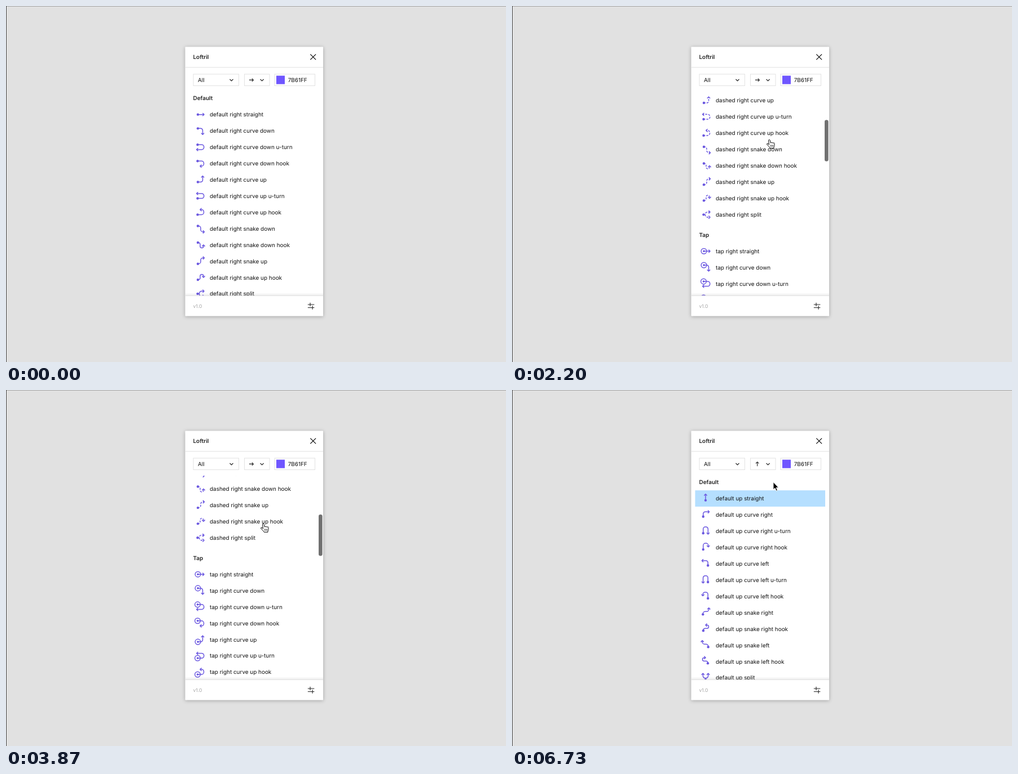
These frames come from a looping animation (886 by 632 pixels, 6.8 s). An HTML page:

```html
<!DOCTYPE html>
<html lang="en">
<head>
<meta charset="utf-8">
<title>Arrow list</title>
<style>
  html, body { margin: 0; width: 100%; height: 100%; overflow: hidden; background: #e1e1e1; }
  svg { display: block; width: 886px; height: 632px; }
  text { font: 9.93px Inter, sans-serif; fill: #111; white-space: pre; text-rendering: geometricPrecision; }
  .bold { font-weight: 600; fill: #222; }
  .line { fill: none; stroke: #222; stroke-width: 1.1; }
  .box { fill: #fff; stroke: #e2e2e2; }
  .ink { fill: none; stroke: #6b58e0; stroke-width: 1.5; stroke-linecap: round; stroke-linejoin: round; }
  .dot { fill: #6b58e0; stroke: none; }
  .panel { fill: #fff; filter: drop-shadow(0 1px 3px rgba(0,0,0,.28)); }
</style>
</head>
<body>
<svg viewBox="0 0 886 632">
  <defs>
    <clipPath id="view"><rect x="318" y="152.5" width="244" height="361.5"/></clipPath>
    <linearGradient id="fade" x2="0" y2="1">
      <stop offset="0" stop-color="#000" stop-opacity="0"/>
      <stop offset="1" stop-color="#000" stop-opacity=".07"/>
    </linearGradient>
  </defs>
  <rect width="886" height="632" fill="#e1e1e1"/>
  <rect width="886" height="1" fill="#a5a5a5"/>
  <rect width="1" height="632" fill="#444"/>
  <rect class="panel" x="317.5" y="72.5" width="244.5" height="478" rx="1"/>

  <g clip-path="url(#view)">
    <rect id="hover" x="324.5" width="230.5" height="28.9" fill="#b5dfff"/>
    <g id="rightList"></g>
    <g id="upList"></g>
  </g>
  <rect x="318" y="509" width="244" height="5" fill="url(#fade)"/>
  <path d="M317.5 109H562M317.5 514.3H562" stroke="#e0e0e0"/>

  <text class="bold" x="331.5" y="94">Loftril</text>
  <path class="line" d="M539.3 85.6l9.8 9.8m0-9.8l-9.8 9.8" style="stroke:#000"/>
  <rect class="box" x="332" y="121" width="80.5" height="20.5"/>
  <rect class="box" x="422.5" y="121" width="44.5" height="20.5"/>
  <rect class="box" x="476" y="121" width="71.5" height="20.5"/>
  <rect x="479" y="123.7" width="15" height="15" fill="#6f56ff"/>
  <text x="340" y="135">All</text>
  <text x="499.7" y="135">7B61FF</text>
  <path class="line" d="M396.5 130l3 3 3-3M450.6 130l3 3 3-3"/>
  <path id="dir" class="line" d="M-3.8 0H3.5M1-2.7L3.7 0 1 2.7"/>
  <text x="331.5" y="536.3" style="font-size:8.6px;fill:#a6a6a6">v1.0</text>
  <path class="line" d="M534.8 530H546.3M539 526.7V533.3M534.8 535.5H546.3M543 532.2V538.8"/>

  <rect id="thumb" x="554" width="6.6" height="73.5" rx="3.3" fill="#707070"/>
  <g id="hand" stroke="#000" stroke-width="1" stroke-linejoin="round">
    <path fill="#fff" d="M-1.6 8.2L-2.4.9A1.3 1.3 0 0 1 .2.4L1.4 5.2A1.2 1.2 0 0 1 3.7 5.1 1.2 1.2 0 0 1 5.9 5.6 1.1 1.1 0 0 1 8 6.5V9.4Q8 11.3 7 12.6V14.3H.3Q-.4 12.9-2 11.2L-5 8.1Q-5.9 6.9-5 6.3-4 5.8-2.9 6.9z"/>
    <path d="M1.3 8.6v3.2M3.4 8.6v3.2M5.5 8.6v3.2" stroke-width=".8"/>
  </g>
  <path id="arrow" fill="#000" stroke="#fff" stroke-width=".9" d="M0 0V13.3L3 10.5 5.2 15.6 7.4 14.7 5.2 9.7H9.3z"/>
</svg>
<script>
const LOOP = 6800, STEP = LOOP / 102, PITCH = 28.93, TOP = 163.7, SECTION = PITCH * 12 + 36;
const el = id => document.getElementById(id);

// Each shape: start point, line, and arrow heads as [x, y, angle]; the second turn is its mirror image.
const shapes = {
  straight: [-4.5, 0, 'H6', [[6.5, 0, 0]]],
  curve: [-4.5, -4.2, 'H.5a3.5 3.5 0 0 1 3.5 3.5V6.3', [[4, 6.6, 90]]],
  'curve u-turn': [-5, -4.2, 'H2.4a3.8 3.8 0 0 1 3.8 3.8v1a3.8 3.8 0 0 1-3.8 3.8H-6.5', [[-6.8, 4.4, 180]]],
  'curve hook': [-5, -4.2, 'H2a4 4 0 0 1 4 4v1a4 4 0 0 1-4 4H0', [[-.6, 4.8, 180]]],
  snake: [-4.5, -4.7, 'H-3.5a4 4 0 0 1 4 4v2.5a4 4 0 0 0 4 4H6.5', [[7, 5.8, 0]]],
  'snake hook': [-4.5, -4, 'H-3.5a3 3 0 0 1 3 3v3.5a3 3 0 0 0 6 0V.5', [[5.5, 0, -90]]],
  split: [-5, 0, 'H-2M6-4.6H2a4 4 0 0 0-4 4v1.2a4 4 0 0 0 4 4H6', [[6.5, -4.6, 0], [6.5, 4.6, 0]]]
};

function startMark(kind, x, y) {
  const circle = (r, extra) => `<circle cx="${x}" cy="${y}" r="${r}" ${extra}/>`;
  const ring = circle(4.8, 'class="ink"');
  if (kind === 'tap') return ring + circle(1.8, 'class="dot"');
  if (kind === 'swipe')
    return ring + circle(1.8, 'class="dot"') +
      `<path class="ink" d="M${x} ${y - 4.8}H-12M${x} ${y + 4.8}H-12"/>`;
  if (kind === 'long press')
    return circle(6.4, 'fill="#7b61ff" opacity=".25"') +
      circle(4.2, 'fill="#7b61ff" opacity=".35"') + circle(2.2, 'class="dot"');
  return circle(2.2, 'class="dot"');
}

function icon(kind, shape, flip, up, y) {
  const [x0, y0, line, heads] = shapes[shape];
  const place = up ? `translate(343 ${y - 1.3}) rotate(-90)` : `translate(344.5 ${y})`;
  const dash = kind === 'dashed' ? 'stroke-dasharray="2.4 3"' : '';
  const tips = heads.map(([x, y, a]) =>
    `<path class="ink" d="M-2.2-2.2L0 0L-2.2 2.2" transform="translate(${x} ${y}) rotate(${a})"/>`).join('');
  return `<g transform="${place} scale(1 ${flip ? -1 : 1})">${startMark(kind, x0, y0)}` +
    `<path class="ink" ${dash} d="M${x0} ${y0}${line}"/>${tips}</g>`;
}

const label = (s, x, y, cls = '') => `<text class="${cls}" x="${x}" y="${y + 3.6}">${s}</text>`;
const heading = (s, y) => label(s[0].toUpperCase() + s.slice(1), 331.5, y, 'bold');

function section(kind, dir, turns, index) {
  const items = [['straight', 'straight', 0]];
  for (const base of ['curve', 'snake'])
    turns.forEach((turn, flip) => {
      const ends = base === 'curve' ? ['', ' u-turn', ' hook'] : ['', ' hook'];
      for (const end of ends) items.push([base + end, `${base} ${turn}${end}`, flip]);
    });
  items.push(['split', 'split', 0]);
  const top = TOP + index * SECTION;
  return heading(kind, top) + items.map(([shape, name, flip], i) => {
    const y = top + PITCH * (i + 1);
    return icon(kind, shape, flip, dir === 'up', y) + label(`${kind} ${dir} ${name}`, 361, y);
  }).join('');
}

function blocks(index) {
  const top = TOP + index * SECTION;
  return heading('block', top) + ['default', 'dashed', 'rounded'].map((name, i) => {
    const y = top + PITCH * (i + 1);
    const dash = name === 'dashed' ? 'pathLength="4" stroke-dasharray=".5 .5" stroke-dashoffset=".25"' : '';
    return `<rect class="ink" x="335.8" y="${y - 6.7}" width="13.4" height="13.4" ` +
      `rx="${name === 'rounded' ? 4 : 1.5}" ${dash}/>` + label(`block ${name}`, 361, y);
  }).join('');
}

const kinds = ['default', 'dashed', 'tap', 'swipe', 'long press'];
el('rightList').innerHTML =
  kinds.map((k, i) => section(k, 'right', ['down', 'up'], i)).join('') + blocks(kinds.length);
el('upList').innerHTML = section('default', 'up', ['right', 'left'], 0);

// Keys are [time, value, ...]; values run straight between them.
function track(keys, t) {
  const i = keys.findIndex(k => k[0] > t);
  if (i === 0) return keys[0].slice(1);
  if (i < 0) return keys[keys.length - 1].slice(1);
  const a = keys[i - 1], b = keys[i], u = (t - a[0]) / (b[0] - a[0]);
  return a.slice(1).map((v, k) => v + (b[k + 1] - v) * u);
}

const scrollKeys = [[1333, 0], [1400, 24], [1600, 75], [1800, 169], [2000, 320], [2600, 931],
  [3267, 1619], [3360, 1670], [3440, 1600], [3867, 631], [4070, 235], [4270, 18], [4333, 0]];
const cursorKeys = [[667, 474, 12], [900, 466, 110], [1130, 459, 205], [1330, 457, 238],
  [4400, 457, 238], [4600, 456, 165], [4733, 455, 131.5], [6000, 455, 131.5],
  [6200, 478, 230], [6400, 490, 320], [6667, 467, 190], [6733, 463, 163.5]];

const move = (node, x, y) => node.setAttribute('transform', `translate(${x} ${y})`);
const show = (node, on) => node.setAttribute('visibility', on ? 'visible' : 'hidden');

function draw(time) {
  const t = Math.floor((time % LOOP + 5) / STEP) * STEP;
  const [scroll] = track(scrollKeys, t);
  const [x, y] = track(cursorKeys, t);
  const up = t >= 5400;

  move(el('rightList'), 0, -scroll);
  show(el('rightList'), !up);
  show(el('upList'), up);
  el('dir').setAttribute('transform', `translate(434.7 131.4) rotate(${up ? -90 : 0})`);

  // The highlight trails the pointer by one step.
  const lagY = track(cursorKeys, t - STEP)[1];
  const row = Math.floor((lagY - TOP) / PITCH - .5);
  const still = t < 1390 || t > 4340;
  show(el('hover'), t > 670 && still && row >= 0);
  el('hover').setAttribute('y', TOP + PITCH * (row + .5));

  el('thumb').setAttribute('y', 111 + scroll * .1742);
  el('thumb').setAttribute('opacity', t < 1390 ? 0 : track([[4660, 1], [4733, .88], [4930, 0]], t)[0]);

  const overRow = y > TOP + PITCH / 2;
  const overSelect = y > 121 && y < 142 && x > 422 && x < 467;
  const hand = overRow || overSelect;
  show(el('hand'), t > 660 && hand);
  show(el('arrow'), t > 660 && !hand);
  move(el('hand'), x, y);
  move(el('arrow'), x, y);
}

const start = performance.now();
(function tick() {
  draw(performance.now() - start);
  requestAnimationFrame(tick);
})();
</script>
</body>
</html>
```
